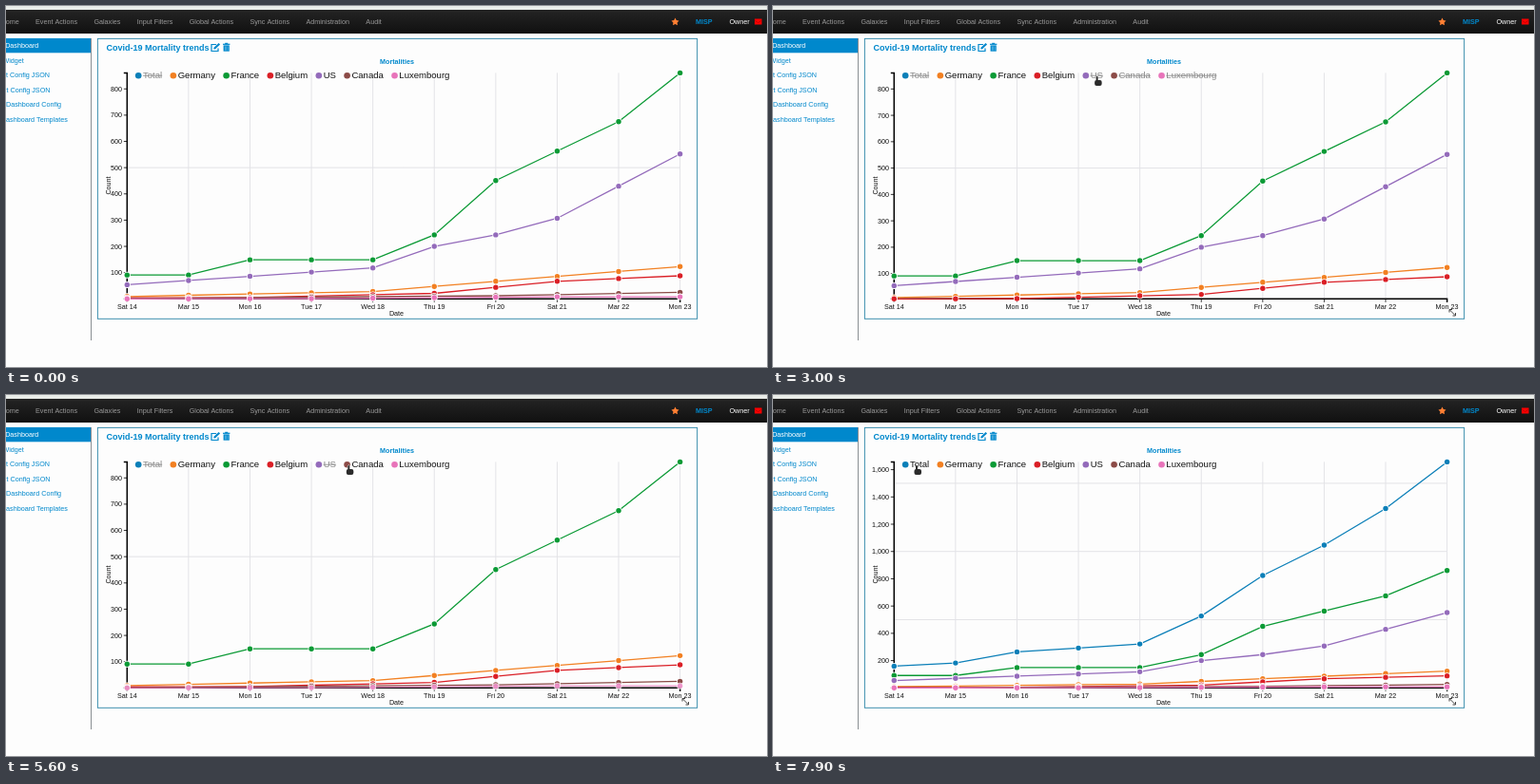
These frames come from a looping animation (800 by 380 pixels, 8000 ms). An HTML page with a canvas:

```html
<!DOCTYPE html>
<html lang="en">
<head>
<meta charset="utf-8">
<title>Mortality trends dashboard</title>
<style>
  html, body { margin: 0; width: 100%; height: 100%; overflow: hidden; background: #fdfdfd; }
  canvas { display: block; width: 800px; height: 380px; }
</style>
</head>
<body>
<canvas id="stage"></canvas>
<script>
const canvas = document.getElementById('stage');
const ctx = canvas.getContext('2d');
const ratio = window.devicePixelRatio || 1;
canvas.width = 800 * ratio;
canvas.height = 380 * ratio;

const LOOP = 8000, STEP = 100, FADE = 500, HOLD = 100, SPEED = 0.3;
const PLOT = { left: 127.3, right: 708.6, top: 70.4, bottom: 308.3 };
const BLUE = '#0088cc', INK = '#111', GRID = '#e3e3e7';
const FONT = '"Liberation Sans", Arial, sans-serif', SMALL = 7.2, LEGEND = 9.55;
const WEEK = ['Sat', 'Mar', 'Mon', 'Tue', 'Wed', 'Thu', 'Fri'];
const DAYS = Array.from({ length: 10 }, (_, i) => `${i === 9 ? 'Mon' : WEEK[i % 7]} ${14 + i}`);

const clamp = v => Math.max(0, Math.min(1, v));
const mix = (a, b, p) => a + (b - a) * p;
const ease = p => p < .5 ? 4 * p ** 3 : 1 - (2 - 2 * p) ** 3 / 2;
const dayX = i => mix(PLOT.left, PLOT.right, i / (DAYS.length - 1));

// Each curve is a few knots, day: value, joined by straight lines.
function curve(knots) {
  const days = Object.keys(knots).map(Number);
  return DAYS.map((_, day) => {
    const a = Math.max(days[0], ...days.filter(d => d <= day));
    const b = days.find(d => d >= day);
    return a === b ? knots[a] : mix(knots[a], knots[b], clamp((day - a) / (b - a)));
  });
}

const countries = [
  { name: 'Germany', color: '#f28022', values: curve({ 0: 9, 4: 28, 6: 67, 9: 123 }) },
  { name: 'France', color: '#0b9a35', values: curve({ 0: 91, 1: 91, 2: 149, 4: 149, 5: 244, 6: 451, 8: 675, 9: 861 }) },
  { name: 'Belgium', color: '#da1f26', values: curve({ 0: 4, 2: 5, 5: 21, 7: 67, 9: 88 }) },
  { name: 'US', color: '#946bbb', values: curve({ 0: 54, 4: 118, 5: 200, 6: 244, 7: 307, 9: 552 }) },
  { name: 'Canada', color: '#8c4b47', values: curve({ 0: 1, 6: 12, 9: 25 }) },
  { name: 'Luxembourg', color: '#e874ba', values: curve({ 0: 0, 3: 1, 7: 8, 9: 8 }) }
];
const sums = DAYS.map((_, i) => countries.reduce((sum, s) => sum + s.values[i], 0));
const series = [{ name: 'Total', color: '#0b7fb8', values: sums }, ...countries];

function setFont(size, weight = '') {
  ctx.font = `${weight} ${size}px ${FONT}`;
}
function layoutRow(labels, x, size, gap) {
  setFont(size);
  return labels.map(label => {
    const item = { label, x, width: ctx.measureText(label).width };
    x += item.width + gap;
    return item;
  });
}
const legend = layoutRow(series.map(s => s.name), 144, LEGEND, 16.5);
const menu = layoutRow(['Home', 'Event Actions', 'Galaxies', 'Input Filters', 'Global Actions',
  'Sync Actions', 'Administration', 'Audit'], -5.5, SMALL, 17.4);

// The pointer visits these in turn; naming a series clicks its legend entry.
const click = (time, name) =>
  ({ time, name, x: legend.find(item => item.label === name).x + 7, y: 74 });
const stops = [
  { time: -100, x: 690, y: 20 }, { time: 800, x: 439, y: 110 },
  click(1600, 'Luxembourg'), click(2500, 'Canada'), click(3000, 'US'), click(3350, 'Belgium'),
  click(4200, 'Belgium'), click(4850, 'Canada'), click(5300, 'Luxembourg'), click(5750, 'US'),
  { time: 6200, x: 296, y: 94 }, click(7350, 'Total')
];

function pointerAt(t) {
  const last = stops.filter(s => s.time + HOLD <= t).length - 1;
  const a = stops[Math.max(0, last)], b = stops[last + 1] || a;
  const distance = Math.hypot(b.x - a.x, b.y - a.y) || 1;
  const p = clamp((t - a.time - HOLD) * SPEED / distance);
  return { x: mix(a.x, b.x, p), y: mix(a.y, b.y, p) };
}

function tickStep(span, count) {
  const raw = span / count, power = 10 ** Math.floor(Math.log10(raw)), error = raw / power;
  return power * (error >= Math.sqrt(50) ? 10 : error >= Math.sqrt(10) ? 5 : error >= Math.SQRT2 ? 2 : 1);
}

function scaleOf(on) {
  const values = series.filter(s => on[s.name]).flatMap(s => s.values);
  const low = Math.min(...values), high = Math.max(...values);
  return { low, high, labels: tickStep(high - low, 10), grid: tickStep(high - low, 2.7) };
}

function chartState(t) {
  const on = {}, alpha = {};
  series.forEach(s => { on[s.name] = s.name !== 'Total'; alpha[s.name] = +on[s.name]; });
  let after = scaleOf(on), before = after, blend = 1, { low, high } = after;
  for (const { time, name } of stops.filter(s => s.name && s.time <= t)) {
    on[name] = !on[name];
    before = after;
    after = scaleOf(on);
    blend = ease(clamp((t - time) / FADE));
    low = mix(low, after.low, blend);
    high = mix(high, after.high, blend);
    alpha[name] = mix(alpha[name], +on[name], blend);
  }
  return { on, alpha, low, high, before, after, blend };
}

function text(str, x, y, size, color, align = 'left', weight) {
  setFont(size, weight);
  ctx.textAlign = align;
  ctx.fillStyle = color;
  ctx.fillText(str, x, y);
}
function line(points, color, width) {
  ctx.beginPath();
  points.forEach(([x, y]) => ctx.lineTo(x, y));
  ctx.strokeStyle = color;
  ctx.lineWidth = width;
  ctx.stroke();
}
function rect(x, y, w, h, color) {
  ctx.fillStyle = color;
  ctx.fillRect(x, y, w, h);
}
function dot(x, y, r, color) {
  ctx.beginPath();
  ctx.arc(x, y, r, 0, Math.PI * 2);
  ctx.fillStyle = color;
  ctx.fill();
}

function drawNavbar() {
  rect(0, 0, 800, 4, '#e9ece8');
  const shade = ctx.createLinearGradient(0, 4, 0, 29);
  shade.addColorStop(0, '#242424');
  shade.addColorStop(1, '#101010');
  rect(0, 4, 800, 25, shade);
  menu.forEach(item => text(item.label, item.x, 19.2, SMALL, '#999'));
  ctx.beginPath();
  for (let i = 0; i < 10; i++) {
    const angle = i * Math.PI / 5 - Math.PI / 2, r = i % 2 ? 2.2 : 4.2;
    ctx.lineTo(703.5 + r * Math.cos(angle), 16.8 + r * Math.sin(angle));
  }
  ctx.fillStyle = '#ff8033';
  ctx.fill();
  text('MISP', 725, 19.2, SMALL, BLUE, 'left', 'bold');
  text('Owner', 760.5, 19.2, SMALL, '#fff');
  rect(787, 13.5, 7.5, 6, '#f00');
  line([[787, 15], [790.7, 17.6], [794.5, 15]], '#a00', .7);
}

function drawSidebar() {
  rect(0, 34, 89.5, 15.3, BLUE);
  rect(89, 34, 1, 318, '#8a8f93');
  ['View Dashboard', 'Add Widget', 'Import Config JSON', 'Export Config JSON',
    'Save Dashboard Config', 'List Dashboard Templates']
    .forEach((label, i) => text(label, -18.3, 44.4 + i * 15.45, SMALL, i ? BLUE : '#fff'));
}

function drawWidget() {
  ctx.strokeStyle = '#3d8fae';
  ctx.lineWidth = 1;
  ctx.strokeRect(96.4, 34.4, 630.2, 294.9);
  text('Covid-19 Mortality trends', 105.5, 46.7, 9, BLUE, 'left', 'bold');
  // Edit and delete icons
  line([[221, 40.5], [216, 40.5], [216, 47.5], [223, 47.5], [223, 44.5]], BLUE, 1.2);
  line([[218.8, 45], [224.3, 39.7]], BLUE, 2.2);
  rect(228, 39.7, 7.4, 1.2, BLUE);
  rect(230.2, 38.8, 3, 1.2, BLUE);
  rect(228.6, 41.4, 6.2, 6.3, BLUE);
  for (let i = -1; i <= 1; i++) rect(231.45 + i * 1.5, 42.5, .5, 4.2, '#8fcbea');
  text('Mortalities', 411, 61, SMALL, BLUE, 'center', 'bold');
}

function drawAxes({ low, high, before, after, blend }, yOf) {
  const { left, right, top, bottom } = PLOT, nib = 3.5;
  const eachTick = (kind, draw) => {
    for (let v = 100; v <= high; v += 100) {
      ctx.globalAlpha = mix(+(v % before[kind] === 0), +(v % after[kind] === 0), blend);
      if (v >= low && ctx.globalAlpha > 0) draw(v, yOf(v));
    }
    ctx.globalAlpha = 1;
  };
  DAYS.forEach((_, i) => line([[dayX(i), top], [dayX(i), bottom]], GRID, 1));
  eachTick('grid', (v, y) => line([[left, y], [right, y]], GRID, 1));
  line([[left - nib, top], [left, top], [left, bottom], [left - nib, bottom]], '#000', 1.5);
  line([[left, bottom + nib], [left, bottom], [right, bottom], [right, bottom + nib]], '#000', 1.5);
  eachTick('labels', (v, y) => {
    line([[left - nib, y], [left, y]], '#000', .8);
    text(v.toLocaleString('en-US'), 122, y + 2.6, SMALL, INK, 'right');
  });
  DAYS.forEach((day, i) => {
    line([[dayX(i), bottom], [dayX(i), bottom + nib]], '#000', .8);
    text(day, dayX(i), 318.7, SMALL, INK, 'center');
  });
  text('Date', 410.5, 325.8, SMALL, INK, 'center');
  ctx.save();
  ctx.translate(109.6, 189);
  ctx.rotate(-Math.PI / 2);
  text('Count', 0, 0, SMALL, INK, 'center');
  ctx.restore();
}

function drawSeries(alpha, yOf) {
  for (const s of series) {
    ctx.globalAlpha = alpha[s.name];
    if (!ctx.globalAlpha) continue;
    const points = s.values.map((v, i) => [dayX(i), yOf(v)]);
    line(points, s.color, 1.3);
    points.forEach(([x, y]) => {
      dot(x, y, 3.5, '#fff');
      dot(x, y, 2.7, s.color);
    });
  }
  ctx.globalAlpha = 1;
}

function drawLegend(on) {
  legend.forEach(({ label, x, width }, i) => {
    dot(x - 4.8, 73.2, 3.3, series[i].color);
    text(label, x, 76.4, LEGEND, on[label] ? INK : '#888');
    if (!on[label]) rect(x, 72.8, width, .8, '#888');
  });
}

function drawCrosshair(t) {
  const { x, y } = pointerAt(t - STEP);
  if (pointerAt(t).y < 80 || y < 80 || x > PLOT.right) return;
  ctx.setLineDash([4, 4]);
  line([[x + .5, PLOT.top], [x + .5, PLOT.bottom]], '#e6e6e8', 1);
  line([[PLOT.left, y + .5], [PLOT.right, y + .5]], '#e6e6e8', 1);
  ctx.setLineDash([]);
}

function drawPointer({ x, y }) {
  ctx.save();
  ctx.translate(x, y);
  ctx.beginPath();
  if (y >= 66 && y < 80) {
    ctx.roundRect(-1, 0, 2, 7, 1);
    ctx.roundRect(-2.5, 4, 7.5, 6, 2);
  } else {
    [[0, 0], [0, 9], [2, 7.2], [3.6, 10.8], [5.2, 10], [3.7, 6.7], [6.4, 6.5]]
      .forEach(point => ctx.lineTo(...point));
    ctx.closePath();
  }
  ctx.strokeStyle = '#fff';
  ctx.lineWidth = 1;
  ctx.stroke();
  ctx.fillStyle = '#2b2b2b';
  ctx.fill();
  ctx.restore();
}

function drawResizeHandle() {
  line([[711.5, 320], [717, 325.5]], '#444', 1);
  line([[711, 322.5], [711, 319.5], [714, 319.5]], '#444', 1);
  line([[717.5, 323], [717.5, 326], [714.5, 326]], '#444', 1);
}

function render(t) {
  ctx.setTransform(ratio, 0, 0, ratio, 0, 0);
  rect(0, 0, 800, 380, '#fdfdfd');
  const state = chartState(t);
  const yOf = v => mix(PLOT.bottom, PLOT.top, (v - state.low) / (state.high - state.low));
  drawNavbar();
  drawSidebar();
  drawWidget();
  drawAxes(state, yOf);
  drawCrosshair(t);
  drawSeries(state.alpha, yOf);
  drawLegend(state.on);
  if (t > 0) {
    drawResizeHandle();
    drawPointer(pointerAt(t));
  }
}

const start = performance.now();
function tick() {
  const t = (performance.now() - start) % LOOP;
  render(Math.floor(t / STEP) * STEP);
  requestAnimationFrame(tick);
}
tick();
</script>
</body>
</html>
```
